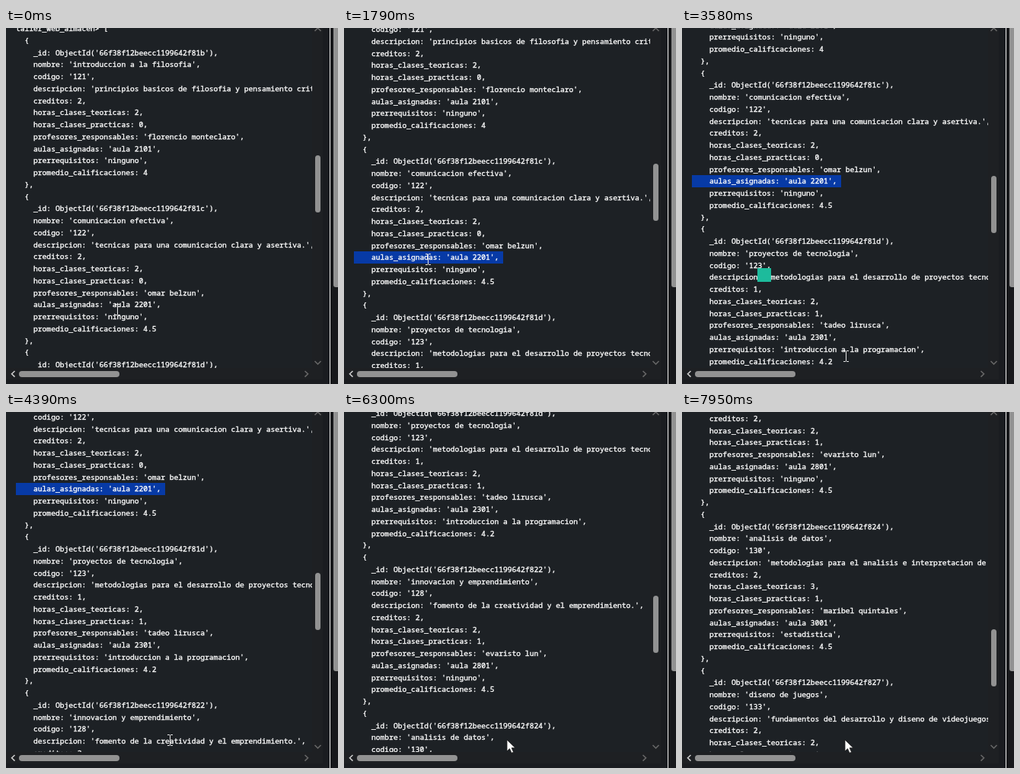
Recreate the animation shown at these times as an HTML page. Size 436 by 467 pixels, loop 8 s.

```html
<!DOCTYPE html>
<html lang="es">
<head>
<meta charset="utf-8">
<title>Consola</title>
<style>
  html, body { margin: 0; width: 100%; height: 100%; overflow: hidden; background: #1a1c20; }
  #stage { position: relative; width: 436px; height: 467px; overflow: hidden; }
  #stage div, #stage svg, pre { position: absolute; }
  #view { left: 0; top: 0; width: 402px; height: 446px; overflow: hidden; background: #1d2125; }
  #page { left: 13px; top: -7px; }
  pre { margin: 0; left: 0; top: 0; color: #fff; font: 500 9.62px/15.75px "Noto Sans Mono", monospace; -webkit-text-stroke: .35px #fff; }
  #mark { left: 0; top: 362px; width: 196px; height: 16px; background: #073aa6; }
  #bars { left: 0; top: 0; }
  #thumb { left: 406px; top: 167px; width: 7px; height: 75px; border-radius: 3.5px; background: #929292; }
  #badge { left: 99px; top: 315px; width: 18px; height: 18px; background: #1dbb9c; }
  #popup { left: 0; top: 176px; width: 237px; height: 115px; background: #1a1b37; color: #fff; }
  .button { left: -10px; height: 34px; border-radius: 6px; background: #ff716d; font: 14px/33px Lato, sans-serif; text-indent: 26px; white-space: nowrap; }
  .button::before { content: ""; position: absolute; left: 9px; top: 11px; width: 12px; height: 12px; border-radius: 50%; background: #fff; }
  .item { top: 93px; font: 10.5px/16px "Open Sans", sans-serif; white-space: nowrap; }
  .rule { top: 93px; width: 1px; height: 17px; background: #50526b; }
  #beam, #arrow { left: 0; top: 0; overflow: visible; }
</style>
</head>
<body>
<div id="stage">
  <div id="view"><div id="page"><div id="mark"></div><pre id="text"></pre></div></div>
  <svg id="bars" width="436" height="467">
    <path d="M402 0h14v461H0v-15h402z" fill="#1e2023"/>
    <path d="M0 461h416V0h9v467H0z" fill="#1a1c20"/>
    <path d="M426 0h10v467h-10z" fill="#17181b"/>
    <path d="M425 0h1v467h-1z" fill="#f0f0f0"/>
    <path d="M430 0h6v340h-3q-3 0-3-3z" fill="#929292"/>
    <rect x="17" y="450" width="132" height="8" rx="4" fill="#929292"/>
    <g fill="none" stroke-width="1.5">
      <path d="M11.500 450l-4 3.800 4 3.800" stroke="#d0d0d0"/>
      <path d="M392.500 450l4 3.800-4 3.800M405.500 437l4 4 4-4M405.500 4l4-4 4 4" stroke="#686868"/>
    </g>
  </svg>
  <div id="thumb"></div>
  <div id="popup">
    <div class="button" style="top:8px;width:110px">Explore more</div>
    <div class="button" style="top:46px;width:88px">Translate</div>
    <div class="item" style="left:-4px">Buscar</div>
    <div class="rule" style="left:47px"></div>
    <div class="item" style="left:65px">Copiar</div>
    <div class="rule" style="left:112px"></div>
    <div class="item" style="left:128px">Captura de pantalla</div>
  </div>
  <div id="badge"></div>
  <svg id="beam" width="1" height="1">
    <path d="M-3.500-7h3m1 0h3M0-6.500v13M-3.500 7h3m1 0h3" fill="none" stroke="#e8e8e8"/>
  </svg>
  <svg id="arrow" width="1" height="1">
    <path d="M0 0V15l3.500-3.300L6 17.300l2.600-1.100L6.200 10.700H11z" fill="#fff" stroke="#1a1a1a" stroke-width=".8"/>
  </svg>
</div>
<script>
const $ = id => document.getElementById(id);
const LOOP = 8000;

const courses = [
  ['1b', 'introduccion a la filosofia', 121, 'principios basicos de filosofia y pensamiento critico.', 2, 2, 0, 'florencio monteclaro', 2101, 'ninguno', 4],
  ['1c', 'comunicacion efectiva', 122, 'tecnicas para una comunicacion clara y asertiva.', 2, 2, 0, 'omar belzun', 2201, 'ninguno', 4.5],
  ['1d', 'proyectos de tecnologia', 123, 'metodologias para el desarrollo de proyectos tecnologicos.', 1, 2, 1, 'tadeo lirusca', 2301, 'introduccion a la programacion', 4.2],
  ['22', 'innovacion y emprendimiento', 128, 'fomento de la creatividad y el emprendimiento.', 2, 2, 1, 'evaristo lun', 2801, 'ninguno', 4.5],
  ['24', 'analisis de datos', 130, 'metodologias para el analisis e interpretacion de datos.', 2, 3, 1, 'maribel quintales', 3001, 'estadistica', 4.5],
  ['27', 'diseno de juegos', 133, 'fundamentos del desarrollo y diseno de videojuegos.', 2, 2, 1, 'nadir olmeda', 3301, 'ninguno', 4.5]
];

const record = ([id, name, code, about, credits, theory, practice, teacher, room, needs, grade]) => `  {
    _id: ObjectId('66f38f12beecc1199642f8${id}'),
    nombre: '${name}',
    codigo: '${code}',
    descripcion: '${about}',
    creditos: ${credits},
    horas_clases_teoricas: ${theory},
    horas_clases_practicas: ${practice},
    profesores_responsables: '${teacher}',
    aulas_asignadas: 'aula ${room}',
    prerrequisitos: '${needs}',
    promedio_calificaciones: ${grade}
  },`;

$('text').textContent = ['taller_web_almacen> [', ...courses.map(record)].join('\n');

// Each move: first step time, last step time, number of steps, end value
const scrollMoves = [
  [170, 890, 9, 50], [980, 1430, 6, 62.5], [2940, 3400, 6, 150],
  [3580, 4300, 9, 262], [4850, 5570, 9, 391.5], [5660, 5840, 3, 401],
  [6210, 6840, 8, 556], [7120, 7390, 4, 682], [7950, 7951, 1, 701]
];
const popupMoves = [[2480, 2680, 3, 0]];

function stepped(moves, value, t) {
  for (const [start, end, steps, to] of moves) {
    if (t < start) break;
    const done = Math.floor((t - start) / (end - start) * (steps - 1) + 1e-6) + 1;
    value += (to - value) * Math.min(1, done / steps);
  }
  return value;
}

const pointerPath = [[1520, 146, 369], [1790, 110, 303], [2090, 110, 303], [2680, 215, 430]];

function pointer(t) {
  let [t0, x0, y0] = pointerPath[0];
  for (const [t1, x1, y1] of pointerPath) {
    if (t < t1) {
      const k = Math.max(0, (t - t0) / (t1 - t0 || 1));
      return [x0 + (x1 - x0) * k, y0 + (y1 - y0) * k];
    }
    [t0, x0, y0] = [t1, x1, y1];
  }
  return [x0, y0];
}

const show = (id, on) => { $(id).style.visibility = on ? 'visible' : 'hidden'; };
const move = (id, x, y) => { $(id).style.transform = `translate(${Math.round(x)}px, ${Math.round(y)}px)`; };

function draw() {
  const t = performance.now() % LOOP;
  const scroll = stepped(scrollMoves, 0, t);
  move('page', 0, -scroll);
  move('thumb', 0, scroll * 0.1683);

  show('mark', t >= 1790);
  show('badge', t >= 2200 && t < 4390);
  show('popup', t >= 2300 && t < 2940);
  $('popup').style.clipPath = `inset(${stepped(popupMoves, 85, t)}px 0 0 0)`;

  const [x, y] = pointer(t);
  const arrow = t >= 4850;
  show('beam', !arrow);
  show('arrow', arrow);
  $('beam').style.transform = `translate(${Math.round(x) + 0.5}px, ${Math.round(y) + 0.5}px)`;
  move('arrow', 214, 430);
  requestAnimationFrame(draw);
}
draw();
</script>
</body>
</html>
```
